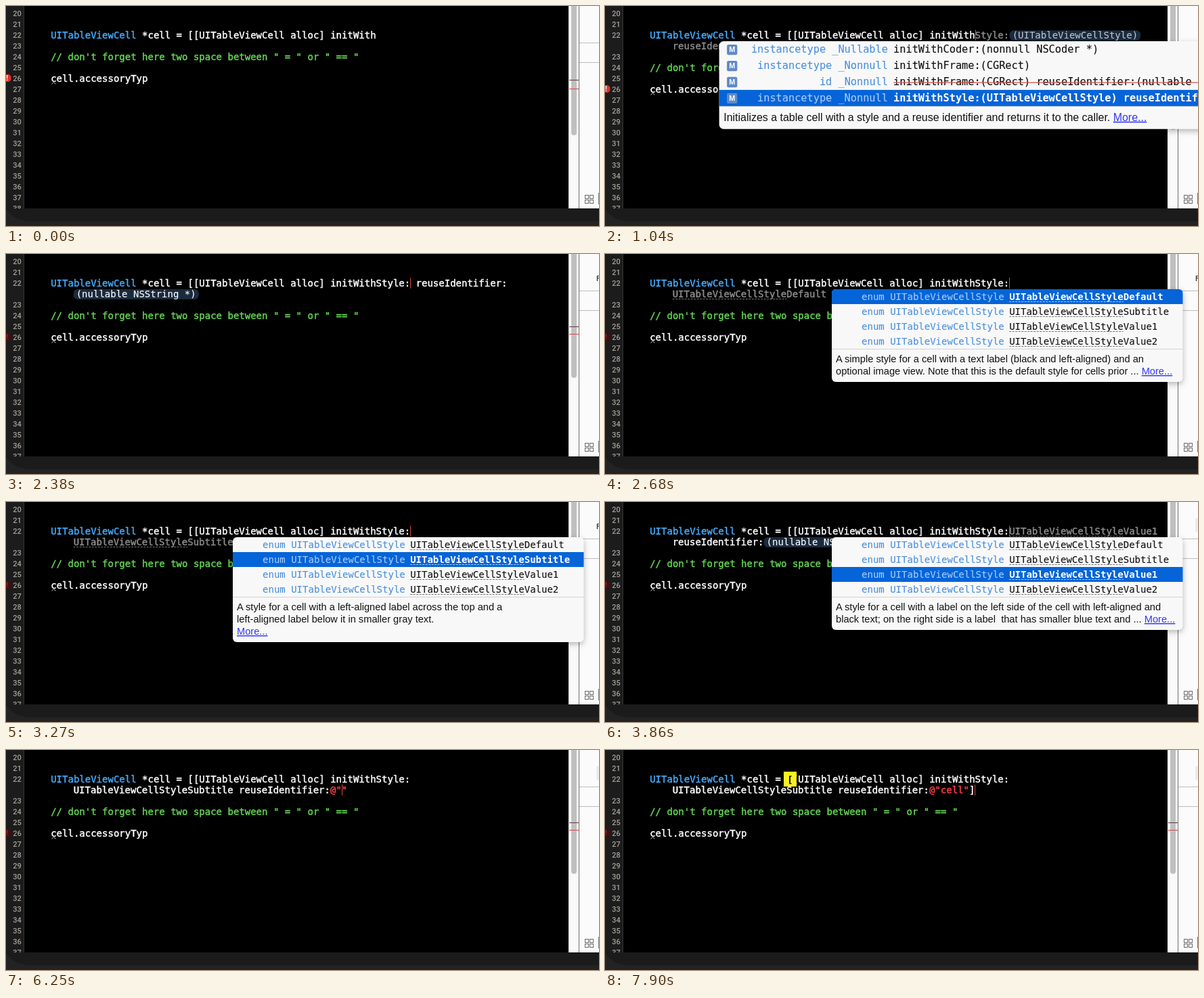
These frames come from a looping animation (876 px wide and 325 px high, 8000 ms). An HTML page:

```html
<!DOCTYPE html>
<html lang="en">
<head>
<meta charset="utf-8">
<title>Code completion</title>
<style>
html, body { margin: 0; width: 100%; height: 100%; overflow: hidden; background: #222; }
svg { display: block; width: 876px; height: 325px; }
text { white-space: pre; }
.code { font: 14px "DejaVu Sans Mono", monospace; stroke-width: .45px; }
.bold { font-weight: bold; stroke-width: 0; }
.thin { stroke-width: .1px; }
.num { font: 500 11px Roboto, sans-serif; }
.doc { font: 14.65px "Liberation Sans", sans-serif; }
.icon { font: bold 10px "Liberation Sans", sans-serif; }
.popup { filter: drop-shadow(0 3px 4px rgba(0, 0, 0, .28)); }
</style>
</head>
<body>
<svg id="stage" viewBox="0 0 876 325" xmlns="http://www.w3.org/2000/svg"></svg>
<script>
const LOOP = 8000, CH = 8.428, LEFT = 66.2, INDENT = 99.7, Y1 = 48, Y2 = 64;
const WHITE = '#fff', GHOST = '#8c8c8c', RED = '#fc3f4b', BLUE = '#44adff', CARET = '#d6423c';
const stage = document.getElementById('stage');
const STYLE = 'UITableViewCellStyle', REUSE = 'reuseIdentifier:', NAME = '(nullable NSString *)';

const rect = (x, y, w, h, fill, extra = '') =>
  `<rect x="${x}" y="${y}" width="${w}" height="${h}" fill="${fill}" ${extra}/>`;
const label = (x, y, s, fill, cls, extra = '') =>
  `<text x="${x}" y="${y}" fill="${fill}" class="${cls}" ${extra}>${s}</text>`;
const code = (x, y, s, fill = WHITE, cls = '') =>
  label(x, y, s, fill, 'code ' + cls, `stroke="${fill}"`);
const line = (x1, y1, x2, y2, color, extra = '') =>
  `<path d="M${x1} ${y1}L${x2} ${y2}" stroke="${color}" ${extra}/>`;
const dots = (x, y, color) =>
  line(x, y, x + 20 * CH, y, color, 'stroke-dasharray="3 1.5" stroke-width="1"');
const caret = (x, y) => rect(Math.round(x), y - 13, 1, 16, CARET);
const pill = (x, y, s, fill = '#1b2b3e', ink = WHITE) =>
  rect(x, y - 12, s.length * CH + 8, 15, fill, 'rx="6"') + code(x + 4, y, s, ink, 'thin');

// Gutter, scroll bar, side panel and the window's lower edge
function chrome(t) {
  const wrapped = t >= 890, dim = t >= 2380;
  let s = rect(0, 0, 876, 325, '#232323') +
    '<path d="M0 299H876V318H38C18 318 6 310 0 299Z" fill="#1b1b1b"/>' +
    rect(0, 0, 27, 299, '#1c1c1c') + rect(27, 0, 804, 299, '#000') + rect(26, 0, 1, 299, '#353535') +
    rect(831, 0, 15, 299, '#fafafa') + rect(835, -10, 8, wrapped ? 193 : 201, '#bfbfbf', 'rx="4"') +
    rect(846, 0, 1, 299, '#6d6d6d') + rect(847, 0, 29, 299, '#fbfbfb') +
    rect(847, 54, 29, 1, '#bdbdbd') + rect(847, 83, 29, 1, '#bdbdbd') +
    rect(832, wrapped ? 107 : 109, 14, 1, '#5a3a3a') + rect(832, wrapped ? 118 : 122, 14, 1, '#e0404a');
  for (let i = 0; i < 4; i++)
    s += rect(855.5 + i % 2 * 7, 279.5 + (i >> 1) * 7, 5, 5, 'none', 'stroke="#6a6a6a"');
  s += rect(875, 276, 1, 17, '#777');
  if (t >= 2380 && t < 3860) s += label(872, 39.5, 'F', '#333', 'num');
  if (t >= 3860) s += rect(872, 24, 4, 20, '#ebebeb');
  if (t >= 4600 && t < 5650) s += rect(873.5, 38.5, 5, 5, 'none', 'stroke="#444"');

  let nums = '';
  for (let n = 20; n <= 38; n++) {
    const y = 15 + (n - 20) * 16 + (wrapped && n > 22 ? 16 : 0);
    nums += label(22.8, y, n, '#a5a199', 'num', 'text-anchor="end"');
  }
  s += `<clipPath id="gut"><path d="M0 0H27V299H0Z"/></clipPath><g clip-path="url(#gut)">${nums}</g>`;

  const y = wrapped ? 122.5 : 106.5;
  s += `<path d="M-.5 ${y - 5.5}H4.5L7.5 ${y - 2.5}V${y + 2.5}L4.5 ${y + 5.5}H-.5Z" fill="${dim ? '#470d0e' : '#e2322c'}"/>` +
    label(0, y + 3.7, '!', dim ? '#8c2a2a' : WHITE, 'icon');
  return s;
}

function typed(t) {
  const x = INDENT + 45 * CH;
  if (t < 5950) return '';
  if (t < 6100) return code(x, Y2, '@', RED) + caret(x + CH, Y2);
  const n = t < 6550 ? 0 : Math.min(4, 1 + Math.floor((t - 6550) / 150));
  const s = code(x, Y2, '@"' + 'cell'.slice(0, n) + '"', RED);
  if (t >= 7900) return s + code(x + 7 * CH, Y2, ']') + caret(x + 8 * CH, Y2);
  return s + caret(x + (2 + n + (t >= 7600)) * CH, Y2);
}

function editor(t) {
  const withEnd = LEFT + 57 * CH, styleEnd = withEnd + 6 * CH, down = t >= 890 ? 16 : 0;
  let s = code(LEFT, Y1, 'UITableViewCell', BLUE) +
    code(LEFT + 16 * CH, Y1, '*cell = [[UITableViewCell alloc] initWith' + (t >= 2380 ? 'Style:' : '')) +
    code(LEFT, 80 + down, '// don\'t forget here two space between " = " or " == "', '#63d652') +
    code(LEFT, 112 + down, 'cell.accessoryTyp') +
    `<path d="M67.5 ${115.5 + down}L70.5 ${112.5 + down}L73.5 ${115.5 + down}" fill="none" stroke="#bbb"/>`;

  if (t >= 450 && t < 2080) s += caret(withEnd, Y1);
  if (t >= 2380 && t < 4600) s += caret(styleEnd, Y1);

  if (t >= 890 && t < 2380) {
    s += code(withEnd, Y1, 'Style:', GHOST) + pill(styleEnd + .5, Y1, `(${STYLE})`, '#1b2b3e', '#b9c2cc') +
      code(INDENT, Y2, REUSE, GHOST) + pill(INDENT + 16 * CH, Y2, NAME, '#1b2b3e', '#b9c2cc');
  } else if (t >= 2380 && t < 2530) {
    s += code(styleEnd + CH, Y1, REUSE) + pill(INDENT, Y2, NAME);
  } else if (t >= 3570 && t < 4010) {
    s += code(styleEnd, Y1, STYLE + 'Value1', GHOST) + dots(styleEnd, 50.5, '#777') +
      code(INDENT, Y2, REUSE) + pill(INDENT + 16 * CH, Y2, NAME);
  } else if (t >= 2530) {
    const kind = t < 3270 ? 'Default' : 'Subtitle', done = t >= 4600;
    const x = INDENT + (21 + kind.length) * CH;
    s += code(INDENT, Y2, STYLE + kind, done ? WHITE : GHOST) + code(x, Y2, REUSE);
    if (!done) s += dots(INDENT, 66.5, '#777');
    if (t < 5950) s += pill(x + 16 * CH + .5, Y2, NAME, t >= 5200 ? '#3d71b8' : '#1b2b3e');
    if (t >= 5050 && t < 5200) s += caret(x - CH, Y2);
  }
  s += typed(t);
  if (t >= 7900)
    s += rect(264, 32, 19, 22, '#fdf022') + label(269.3, 48.5, '[', '#000', 'code bold');
  return s;
}

// rows: [type, name, struck]; col is where the names begin
function popup(o) {
  const { x, w, col, rows, pick, doc, prefix, zoom, pivot, alpha } = o;
  const h = 101 + doc.length * 18;
  let s = rect(x, 52, w, h, '#f8f8f8', 'rx="6"');
  rows.forEach(([type, name, struck], i) => {
    const on = i === pick, y = 68 + i * 22;
    if (on) s += i ? rect(x, y - 16, w, 22, '#0564d8')
      : `<path d="M${x} 74V58q0-6 6-6h${w - 12}q6 0 6 6V74Z" fill="#0564d8"/>`;
    if (!prefix)
      s += rect(x + 10.5, y - 11.5, 14, 14, '#5f8ac8', 'rx="2"') +
        label(x + 17.5, y - .9, 'M', WHITE, 'icon', 'text-anchor="middle"');
    s += code(col + 1 - (type.length + 1) * CH, y, type, on ? '#a5cbfa' : '#4a90de', 'thin') +
      code(col, y, name, on ? WHITE : '#111', on ? 'bold' : 'thin');
    if (prefix) s += dots(col, y + 2.5, on ? '#a5cbfa' : '#777');
    if (struck) s += line(col, y - 4, col + name.length * CH, y - 4, '#d9534f', 'stroke-width="1.2"');
  });
  s += rect(x, 140, w, 1, '#d2d2d2');
  doc.forEach((d, i) => {
    const more = i === doc.length - 1 ? '<tspan fill="#3339f0" text-decoration="underline">More...</tspan>' : '';
    s += label(x + 6, 160 + i * 18, d + more, '#111', 'doc');
  });
  return `<g class="popup" opacity="${alpha}" transform="translate(${pivot} 52) scale(${zoom}) translate(${-pivot} -52)">${s}</g>`;
}

const INITS = [
  ['instancetype _Nullable', 'initWithCoder:(nonnull NSCoder *)'],
  ['instancetype _Nonnull', 'initWithFrame:(CGRect)'],
  ['id _Nonnull', 'initWithFrame:(CGRect) ' + REUSE + NAME, true],
  ['instancetype _Nonnull', `initWithStyle:(${STYLE}) ` + REUSE + NAME]
];
const KINDS = ['Default', 'Subtitle', 'Value1', 'Value2'].map(k => ['enum ' + STYLE, STYLE + k]);
const DOCS = [
  ['A simple style for a cell with a text label (black and left-aligned) and an',
    'optional image view. Note that this is the default style for cells prior ... '],
  ['A style for a cell with a left-aligned label across the top and a',
    'left-aligned label below it in smaller gray text.', ''],
  ['A style for a cell with a label on the left side of the cell with left-aligned and',
    'black text; on the right side is a label  that has smaller blue text and ... ']
];

function completion(t) {
  if (t >= 1040 && t < 2380)
    return popup({
      x: 243, w: 1652, col: LEFT + 49 * CH, rows: INITS, pick: 3, pivot: 1069,
      doc: ['Initializes a table cell with a style and a reuse identifier and returns it to the caller. '],
      zoom: t < 1190 ? 1.09 : t < 1330 ? 1.02 : 1, alpha: 1
    });
  if (t >= 2530 && t < 4600) {
    const pick = t < 3270 ? 0 : t < 3570 ? 1 : t < 4010 ? 2 : 1;
    return popup({
      x: 335, w: 518.5, col: LEFT + 63 * CH, rows: KINDS, pick, doc: DOCS[pick], prefix: true,
      pivot: 594, zoom: t < 2680 ? 1.05 : 1, alpha: t < 2680 ? .9 : 1
    });
  }
  return '';
}

let last = '';
function draw(t) {
  const s = chrome(t) + editor(t) + completion(t);
  if (s !== last) stage.innerHTML = last = s;
}

const start = performance.now();
function tick(now) {
  draw(Math.max(0, now - start) % LOOP);
  requestAnimationFrame(tick);
}
draw(0);
requestAnimationFrame(tick);
</script>
</body>
</html>
```
